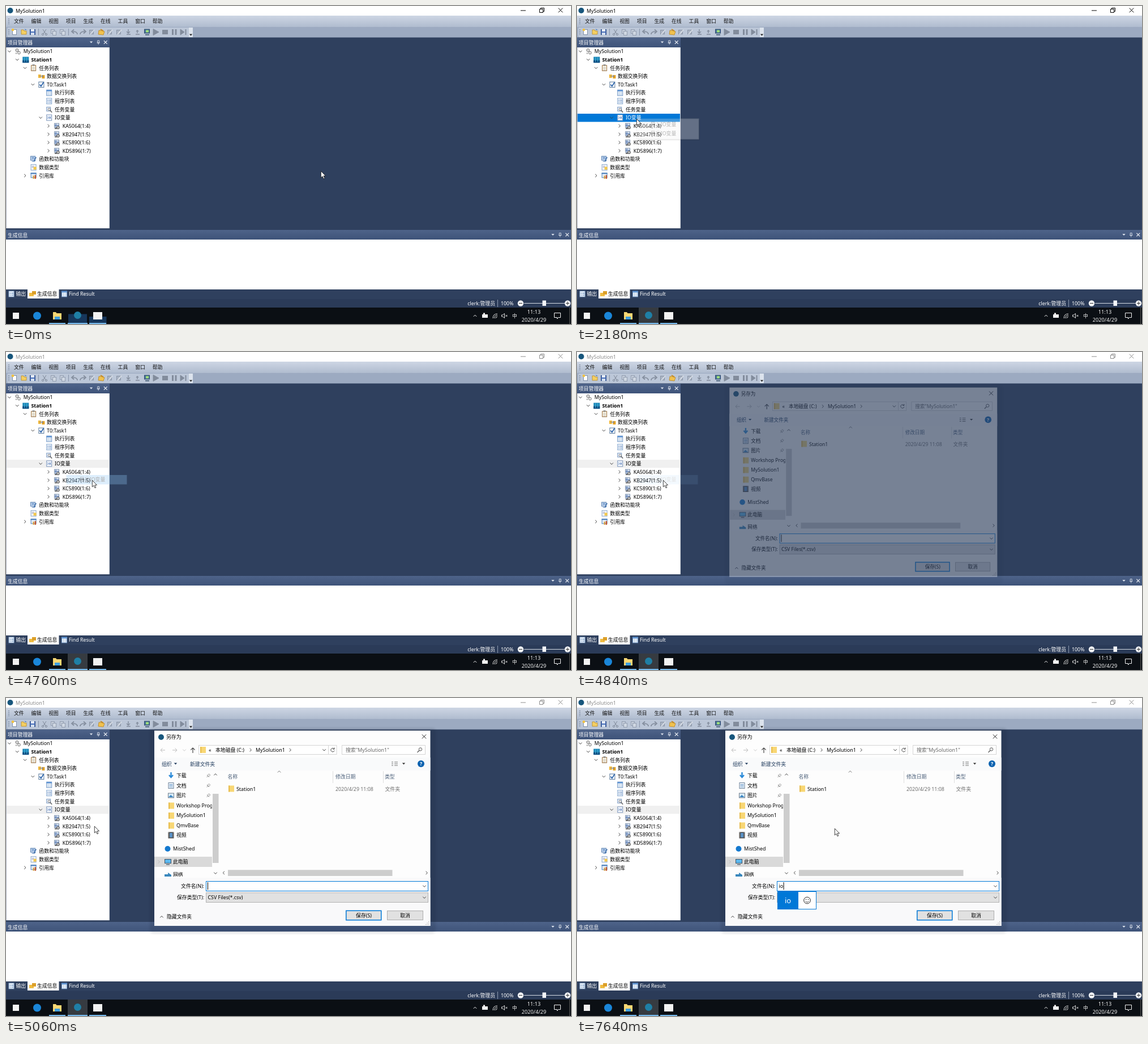
Write an HTML page that moves like this. It is 998 px wide and 561 px high and loops after 8000 ms.

```html
<!DOCTYPE html>
<html lang="zh-CN">
<head>
<meta charset="utf-8">
<title>MySolution1</title>
<style>
html, body { margin: 0; width: 998px; height: 561px; overflow: hidden; background: #2f405e }
svg { display: block; font: 8.85px "Noto Sans", "Noto Sans CJK SC", "Noto Sans CJK", sans-serif }
text { white-space: pre }
</style>
</head>
<body>
<svg id="stage" width="998" height="561" viewBox="0 0 998 561"></svg>
<script>
const rect = (x, y, w, h, fill, more = '') => `<rect x="${x}" y="${y}" width="${w}" height="${h}" fill="${fill}" ${more}/>`;
const box = (x, y, w, h, fill, line, lw = 1) => rect(x + lw / 2, y + lw / 2, w - lw, h - lw, fill, `stroke="${line}" stroke-width="${lw}"`);
const text = (x, y, s, fill = '#000', more = '') => `<text x="${x}" y="${y}" fill="${fill}" ${more}>${s}</text>`;
const dot = (x, y, r, fill, more = '') => `<circle cx="${x}" cy="${y}" r="${r}" fill="${fill}" ${more}/>`;
const path = (d, line = '#333', w = 1, fill = 'none', more = '') => `<path d="${d}" fill="${fill}" stroke="${line}" stroke-width="${w}" ${more}/>`;
const dashed = (d, line, w, dash) => path(d, line, w, 'none', `stroke-dasharray="${dash}"`);
const place = (x, y, s, turn = 0) => `<g transform="translate(${x} ${y}) rotate(${turn})">${s}</g>`;
const chevron = (x, y, turn = 0, line = '#444') => place(x, y, path('M-2.7-1.4L0 1.4L2.7-1.4', line), turn);
const arrowDown = (x, y, fill) => path(`M${x - 2.7} ${y - 1.4}h5.4l-2.7 2.9z`, 'none', 0, fill);
const cross = (x, y, r, line, w = 1) => path(`M${x - r} ${y - r}l${2 * r} ${2 * r}m0 ${-2 * r}l${-2 * r} ${2 * r}`, line, w);
const pin = (x, y, line, turn = 0) => place(x, y, path('M-1.5-3h3v4h-3zM-2.6 1h5.2M0 1v3', line, .9), turn);
const folder = (x, y, w = 10, h = 11) => rect(x, y, w, h, '#f8d775') + rect(x, y, w * .22, h, '#e8bd4e');

const BLUE = '#0078d7', LOGO = '#17567c';

// Icons are drawn around their own centre.
const page = (line, inner) => box(-5, -5.5, 10, 11, '#f6f9fd', line) + inner;
const icons = {
  gears: dot(-1.5, -2, 2.6, '#ddd', 'stroke="#777"') + dot(2, 2.5, 2.4, '#eee', 'stroke="#777"') + dot(-3, 3.5, 1.3, '#aaa'),
  station: rect(-5.5, -5, 11, 10.5, '#1b87b8') + rect(-5.5, 1, 11, 4.5, '#0b4c80') + path('M-2-4v8M2-4v8', '#55bce0'),
  clip: box(-4.5, -5, 9, 10.5, '#fff7e6', '#9a7040') + rect(-2, -6, 4, 2, '#777') + path('M-2.5-1h5M-2.5 1.5h5M-2.5 4h5', '#999', .7),
  swap: rect(-5.5, -3, 5, 6, '#f0b83c') + rect(1, -2, 5, 6, '#e6a323') + path('M-3 0h6M1-2l2 2l-2 2', '#6a7fa5'),
  check: box(-5, -5, 10, 10.5, '#fff', '#56779b') + path('M-3 0l2.4 3L4-4', '#245fa8', 1.7),
  table: page('#6d93c4', rect(-4.5, -5, 9, 2.5, '#5b92d2') + path('M-4.5 0h9M-4.5 3h9M-1.5-2v7M2-2v7', '#a9c3e0', .7)),
  list: page('#86a7cf', path('M-3-2h2M0-2h3.5M-3 0h2M0 0h3.5M-3 2.5h2M0 2.5h3.5', '#5b86bb', .9)),
  tag: box(-5, -4.5, 8, 8, '#e7eef8', '#7e9cc2') + dot(0, 0, 2, '#fff', 'stroke="#777"') + path('M1.5 1.5l3.5 4', '#666', 1.5),
  io: page('#7b94bb', path('M-3-2l2 2l-2 2M0-2l3 4m0-4l-3 4', '#3c67ad', .9)),
  card: box(-5, -5, 9, 8, '#dce6f2', '#7f93ad') + path('M-4-1l7 0M-2-4v7', '#3f64a5', 1) + dot(2, 2.8, 2.5, '#bbb', 'stroke="#555"') + rect(-4, 3.5, 4, 2, '#666'),
  func: rect(-5, -5, 8, 7, '#cadcf2', 'stroke="#577eaf"') + path('M-3-3h4M-3-1h4M-3 4h3', '#4476b5') + path('M0 4l2.5-1V-1l2.5-2', '#3568a8', 1.6),
  type: page('#8aa6c8', path('M-3-2h4M-3 0h4', '#88a', .8) + rect(0, -1, 5, 5, '#f3c84b')),
  lib: box(-5, -5, 10, 9, '#e6eef8', '#4e82bd') + rect(-5, -5, 10, 2, '#4e82bd') + rect(-1, 0, 2, 5.5, '#d99b28') + rect(2, -1, 2.5, 6.5, '#c7572f')
};

// [level, icon, label, 1 = open or 2 = closed branch]
const rows = [
  [0, 'gears', 'MySolution1', 1], [1, 'station', 'Station1', 1], [2, 'clip', '任务列表', 1],
  [3, 'swap', '数据交换列表'], [3, 'check', 'T0:Task1', 1], [4, 'table', '执行列表'],
  [4, 'list', '程序列表'], [4, 'tag', '任务变量'], [4, 'io', 'IO变量', 1],
  [5, 'card', 'KA5064(1:4)', 2], [5, 'card', 'KB2947(1:5)', 2], [5, 'card', 'KC5890(1:6)', 2],
  [5, 'card', 'KD5896(1:7)', 2], [2, 'func', '函数和功能块'], [2, 'type', '数据类型'], [2, 'lib', '引用库', 2]
];

const tree = () => rows.map(([level, icon, label, fold], i) => {
  const x = 31 + 13.8 * level, y = 80 + 14.62 * i;
  const mark = fold ? chevron(x - 25, y, fold == 2 ? -90 : 0) : '';
  const more = (i == 1 ? 'font-weight="bold"' : '') + (i == 8 ? 'id="ioLabel"' : '');
  return mark + place(x - 10, y, icons[icon]) + text(x - .3, y + 3.3, label, '#000', more);
}).join('');

function toolbar() {
  const grey = '#828c9c', y = 46;
  const sheet = x => box(x - 5, y - 5, 7, 8, '#c5cedb', '#929daf') + box(x - 2, y - 2, 7, 8, '#cfd7e2', '#929daf');
  const bolt = x => box(x - 5, y - 4, 8, 8, '#aab4c4', '#8a95a6') + path(`M${x - 3} ${y + 4}l7-8`, '#e0e5ec', 1.5);
  return dashed('M5 41v10', '#6c7a92', 1.4, '1.5 1.5') +
    box(11, 41, 8, 10, '#fff', '#7f8fa8') + dot(12, 42, 2.3, '#f2c140') +
    path('M27 50v-8h4l1 2h4v6z', '#b48a2a', .8, '#f4cf62') + path('M33 41l3 1', '#3a72b8') +
    box(42, 41, 10, 10, '#4a70b8', '#33508a') + rect(44, 41, 6, 4, '#e9eff8') + rect(44, 47, 6, 4, '#d3deee') +
    path('M57.5 40v12M110.5 40v12', '#8692a8') +
    path('M65 41l5 8M71 41l-5 8', grey) + dot(65, 50, 1.6, 'none', `stroke="${grey}"`) + dot(71, 50, 1.6, 'none', `stroke="${grey}"`) +
    sheet(84) + sheet(100) +
    path('M126 50q0-5-8-5M120 41.5l-4 3.5l4 3.5', grey, 1.7) + path('M131 50q0-5 8-5M137 41.5l4 3.5l-4 3.5', grey, 1.7) +
    bolt(152) + path('M163 50l1-7h3l7 2l-2 6z', '#b48428', .8, '#f0c14e') + path('M167 41l5 3', '#c98b1f', 2) +
    bolt(184) + bolt(200) + path('M216 41v6M213 45l3 3l3-3M213 50h7M232 48v-5M230 45l2-2l2 2M229 50h7', grey, 1.4) +
    box(244, 40.5, 10, 8, '#44709b', '#334d6c') + rect(247, 42.5, 5, 4, '#9fdd79') + rect(246, 50, 7, 1.5, '#37516d') +
    path('M260 40.5l10 5.5l-10 5.5z', grey, 1, grey) + rect(276, 42, 10, 8, grey) + rect(293, 41, 3, 10, grey) + rect(298.5, 41, 3, 10, grey) +
    path('M308 41l7 5l-7 5z', grey, 1, grey) + path('M317.5 41v10', grey, 2) +
    rect(323, 38, 7, 17, '#dce3ed') + arrowDown(326.5, 51, '#222');
}

const paneMarks = (x, y) => arrowDown(x, y, '#dfe5ef') + pin(x + 12.7, y, '#dfe5ef') + cross(x + 25.3, y, 2.9, '#eef1f6', 1.2);

function windowBase() {
  const menus = ['文件', '编辑', '视图', '项目', '生成', '在线', '工具', '窗口', '帮助'];
  return `<defs>
      <linearGradient id="bar" x2="0" y2="1"><stop stop-color="#ced6e4"/><stop offset="1" stop-color="#b0bccf"/></linearGradient>
      <linearGradient id="head" x2="0" y2="1"><stop stop-color="#4e6389"/><stop offset="1" stop-color="#3e5379"/></linearGradient>
      <clipPath id="side"><path d="M262 128h102v187H262z"/></clipPath>
    </defs>` +
    rect(0, 0, 998, 561, '#2f405e') + rect(0, 0, 998, 17, '#fff') + dot(7.5, 8, 5, LOGO) +
    `<g id="titleBar">` + text(17, 11.5, 'MySolution1', 'currentColor') +
    path('M909 8h9M942.5 5.5h6v6h-6zM944.5 5.5v-2h6v6h-2', 'currentColor') + cross(979.5, 7.5, 3.8, 'currentColor') + '</g>' +
    rect(0, 17, 998, 20, 'url(#bar)') + rect(0, 37, 998, 18.5, '#9caac1') + rect(2, 38, 328, 17, '#bcc7d8', 'rx="2"') +
    menus.map((s, i) => text(14 + 30.6 * i, 30, s, '#111')).join('') +
    dashed('M5 22v10', '#6c7a92', 1.4, '1.5 1.5') + toolbar() +
    rect(0, 56, 183, 17, 'url(#head)') + text(3, 67.5, '项目管理器', '#fff') + paneMarks(150.5, 64) +
    rect(.4, 73, 182.4, 319.2, '#fff') + rect(1, 190, 181, 14.4, 'none', 'id="rowFill"') + tree() +
    rect(0, 395, 998, 17, 'url(#head)') + text(3, 407.5, '生成信息', '#fff') + paneMarks(966, 403.5) +
    rect(0, 412, 998, 88, '#fff') + rect(38, 500, 55.5, 16, '#fff') +
    place(9.5, 508, icons.list) + text(17.5, 511, '输出', '#fff') +
    rect(41, 506, 8, 6, '#f0bd42') + rect(46, 503, 7, 6, '#dca02a') + text(55, 511, '生成信息') +
    place(103, 508, icons.table) + text(111, 511, 'Find Result', '#fff') +
    rect(0, 517, 998, 15, '#2b3b58') + text(864, 528, 'clerk:管理员', '#fff', 'text-anchor="end"') +
    path('M868.5 518v13', '#8d9ab0') + text(874, 528, '100%', '#fff') +
    path('M915 524.5h72', '#d4dae4') + rect(947.5, 519.5, 6.5, 9.5, '#f4f6f9') +
    dot(909, 524.5, 5.2, '#f4f6f9') + dot(992, 524.5, 5.2, '#f4f6f9') + path('M906 524.5h6M989 524.5h6M992 521.5v6', '#333');
}

function taskbar() {
  const white = '#f2f2f2', line = '#76b9ed';
  return rect(0, 532, 998, 29, '#0b0f14') +
    `<g id="barEarly">` + rect(110, 543.5, 33, 18, '#17375c') + rect(147, 548, 30.5, 13, '#17375c') + '</g>' +
    rect(109, 532, 35, 29, '#363b41', 'id="barActive"') +
    rect(12, 541, 11, 11, white) + dot(55, 546.5, 7, '#1a86d9') +
    path('M83 553v-13h5l1.5 2H98v11z', 'none', 0, '#f7d774') + rect(86, 548, 9, 5, '#3f9fe0') +
    dot(126.5, 545.5, 6.5, '#1f7fa5') + rect(154, 540, 16, 13, white) +
    rect(76, 559, 29, 2, line) + rect(109, 559, 35, 2, line) + rect(147, 559, 30, 2, line) +
    chevron(828.5, 546.5, 180, white) + rect(841, 544, 10, 6, white) + rect(843, 541.5, 3, 3, white) +
    path('M860 551q0-8 8-8M862.5 551q0-5.5 5.5-5.5M865 551q0-3 3-3', '#ddd') +
    path('M875.5 545h2l3-2.5v8l-3-2.5h-2zM882.5 545l3 3m0-3l-3 3', white, .9) +
    text(894, 550, '中', white) +
    text(932.5, 543, '11:13', white, 'text-anchor="middle" font-size="9.2"') +
    text(932.5, 556.5, '2020/4/29', white, 'text-anchor="middle" font-size="9.2"') +
    path('M968.5 541.5h11v8h-4l-2 2.5v-2.5h-5z', white) + path('M995.5 532v29', '#555');
}

const menu = () => `<g id="menu"><g id="menuFrame">` +
  rect(107, 201, 110, 36, '#000', 'opacity=".3"') + box(104.5, 198.5, 111, 37, '#f2f2f2', '#c4c4c4') + '</g>' +
  rect(106.5, 201, 107, 16, '#91c9f7', 'id="hover1"') + rect(106.5, 217, 107, 16.5, '#91c9f7', 'id="hover2"') +
  text(130, 212, '导入IO变量', '#000', 'id="menuText1"') + text(130, 228.3, '导出IO变量') + '</g>';

function sidebar() {
  const names = ['下载', '文档', '图片', 'Workshop Progr', 'MySolution1', 'QmvBase', '视频'];
  const marks = [
    path('M291.5 131v8M288 136l3.5 4l3.5-4', '#2b8ad8', 2.4),
    place(291.5, 154.5, page('#6a8098', path('M-3-2h6M-3 0h6M-3 2.5h6', '#4d87c0', .9))),
    box(286, 167.5, 11, 9, '#d9ecfa', '#707d8a') + path('M287 175l4-4l5 4z', 'none', 0, '#3b86c4'),
    folder(287, 184.5), folder(287, 202), folder(287, 219.5),
    rect(286.5, 236.5, 10, 11, '#444') + rect(289, 238, 5, 8, '#5b91c5') + dashed('M287.7 237v10M295.3 237v10', '#ddd', .8, '1 1')
  ];
  return `<g clip-path="url(#side)">` + rect(262, 280, 102, 18, '#d9d9d9') +
    names.map((s, i) => marks[i] + text(301, 140.3 + 17.5 * i, s) + (i < 3 ? pin(357.5, 137 + 17.5 * i, '#888', 45) : '')).join('') +
    dot(285.5, 266, 5, '#1479cf') + text(295, 269, 'MistShed') +
    chevron(270, 289, -90, '#bbb') + box(280, 284, 12, 8, '#5bb8ee', '#456') + rect(283, 293, 6, 1.5, '#567') + text(295, 292.3, '此电脑') +
    path('M280 315v-4h6v-3l6 4v3z', 'none', 0, '#3a88bd') + text(295, 315, '网络') + '</g>';
}

const dialog = () => {
  const grey = '#6d6d6d', head = '#4c607a';
  return `<g id="dialog">` +
    rect(254, 53, 505, 362, '#101a2c', 'rx="6" opacity=".13" style="filter:blur(2px)"') +
    rect(262, 57.5, 487.5, 344.5, '#fdfdfd') + rect(262, 105, 487.5, 23, '#f9fafb') + rect(262, 317, 487.5, 85, '#f9f9fa') +
    dot(274, 69, 5, LOGO) + text(283, 72.2, '另存为') + cross(738.5, 68, 3.6, '#222') +
    path('M281 92h-8m3.5-3.5l-3.5 3.5l3.5 3.5M294 92h8m-3.5-3.5l3.5 3.5l-3.5 3.5', '#bbb') + chevron(315, 92, 0, '#ccc') +
    path('M330 97v-9m-3.7 3.7l3.7-3.7l3.7 3.7', '#444', 1.2) +
    box(340, 83, 244.5, 17, '#fff', '#d5d5d5') + folder(343, 86) + text(358, 94.5, '«') +
    text(370, 94.7, '本地磁盘 (C:)') + chevron(432, 91.7, -90) + text(441, 94.7, 'MySolution1') + chevron(502, 91.7, -90) +
    chevron(562, 91.7) + path('M569.5 84v15', '#d5d5d5') + path('M579.7 90a3.2 3.2 0 1 0 .4 2.7M580 87.5v2.7h-2.7', '#444') +
    box(593, 83, 148, 17, '#fff', '#d5d5d5') + text(600, 94.7, '搜索"MySolution1"', '#666') +
    dot(732, 90.5, 2.7, 'none', 'stroke="#555"') + path('M730 92.5l-3.5 3.5', '#555', 1.3) +
    text(275, 119.6, '组织', '#1e395b') + arrowDown(299.5, 116, '#1e395b') + text(325, 119.6, '新建文件夹', '#1e395b') +
    path('M681 113h3M681 116h3M681 119h3M686 113h6M686 116h6M686 119h6', '#777', 1.2) + arrowDown(702.5, 116, '#333') +
    dot(733, 116, 6, '#0b62b0') + text(733, 119.4, '?', '#fff', 'text-anchor="middle" font-weight="bold"') +
    sidebar() +
    rect(365, 169, 10.5, 122, '#cdcdcd') + chevron(370, 135, 180) + chevron(370, 309) +
    chevron(482.5, 130, 180, '#777') + path('M577.5 129v21M666.5 129v21', '#dedede') +
    text(391.5, 142, '名称', head) + text(582, 142, '修改日期', head) + text(669, 142, '类型', head) +
    folder(393, 154.5) + text(407, 163.7, 'Station1') + text(582, 163.7, '2020/4/29 11:08', grey) + text(669.5, 163.7, '文件夹', grey) +
    rect(392, 303.3, 290.5, 10.7, '#cdcdcd') + chevron(384.5, 308.5, 90) + chevron(743, 308.5, -90) +
    text(350, 335, '文件名(N):', '#000', 'text-anchor="end"') + box(353, 323, 393, 18, '#fff', BLUE) + chevron(739, 332) +
    text(350, 355, '保存类型(T):', '#000', 'text-anchor="end"') + box(353, 343, 393, 18, '#e1e1e1', '#b3b3b3') +
    text(356.5, 355, 'CSV Files(*.csv)') + chevron(739, 352) +
    chevron(275, 386, 180) + text(284, 388.7, '隐藏文件夹') +
    box(600, 374.5, 63.5, 18, '#e1e1e1', BLUE, 1.5) + text(632, 386.5, '保存(S)', '#000', 'text-anchor="middle"') +
    box(673, 375, 64, 17, '#e1e1e1', '#adadad') + text(705, 386.5, '取消', '#000', 'text-anchor="middle"') +
    dashed('M741 399.5h7M743.5 397h5M746 394.5h2', '#aaa', 1.2, '1.2 1.2') +
    text(356.5, 335, '', '#000', 'id="typed"') + rect(0, 325, 1, 13.3, '#000', 'id="caret"') +
    `<g id="ime">` + box(354, 341, 69, 32, '#fff', BLUE) + rect(354, 341, 37, 32, BLUE) +
    text(372.5, 362, '', '#fff', 'id="candidate" text-anchor="middle" font-size="13"') +
    dot(406.5, 357, 5.8, 'none', 'stroke="#222"') + dot(404.5, 355.5, .8, '#222') + dot(408.5, 355.5, .8, '#222') +
    path('M403.5 358.7q3 3.2 6 0', '#222', .9) + '</g></g>';
};

document.getElementById('stage').innerHTML = windowBase() + taskbar() + menu() + dialog() +
  `<path id="cursor" d="M.3.3V12l2.7-2.5 2 4.4 1.9-.9-2-4.2h3.7z" fill="#fff" stroke="#111" stroke-width=".8"/>`;

// [start, end, points]: one point per evenly spaced step.
const moves = [
  [390, 1170, [[567, 297], [579, 299], [560, 290], [500, 270], [420, 248], [330, 230], [250, 218], [190, 211], [150, 207], [130, 206]]],
  [1260, 1550, [[127, 206], [121, 204], [114, 202], [108, 200], [105, 199]]],
  [2960, 3520, [[107, 202], [113, 206], [120, 211], [128, 216], [137, 220], [145, 223], [150, 225], [152, 226]]],
  [5060, 5370, [[156, 226], [165, 225], [185, 223], [218, 219], [262, 217]]],
  [5440, 5590, [[403, 233], [428, 229], [455, 230]]]
];

function cursorAt(t) {
  let at = [556, 291];
  for (const [a, b, points] of moves)
    points.forEach((p, i) => { if (t >= a + (b - a) * i / (points.length - 1)) at = p; });
  return at;
}

// Value of the latest [time, value] pair already reached.
const latest = (t, first, ...steps) => steps.reduce((v, [at, next]) => t >= at ? next : v, first);
const el = id => document.getElementById(id);
const show = (id, opacity) => el(id).setAttribute('opacity', +opacity);

function draw(t) {
  const [x, y] = cursorAt(t), open = t < 4580;
  el('cursor').setAttribute('transform', `translate(${x} ${y})`);
  show('barEarly', t < 70);
  show('barActive', t >= 70);
  el('titleBar').style.color = t < 4680 ? '#000' : '#8c8c8c';
  el('rowFill').setAttribute('fill', latest(t, 'none', [2180, BLUE], [4680, '#f0f0f0']));
  el('ioLabel').setAttribute('fill', t >= 2180 && t < 4680 ? '#fff' : '#000');

  show('menu', latest(t, 0, [2180, .27], [2260, .65], [2330, 1], [4580, .85], [4680, .55], [4760, .3], [4840, .1], [4900, 0]));
  show('menuFrame', open);
  show('menuText1', open);
  show('hover1', t >= 2960 && y > 201 && y < 217);
  show('hover2', t >= 2960 && y >= 217 || !open);

  const scale = latest(t, .97, [4900, .99], [4980, 1]);
  show('dialog', latest(t, 0, [4840, .35], [4900, .81], [4980, 1]));
  el('dialog').setAttribute('transform', `translate(505.7 229.7) scale(${scale}) translate(-505.7 -229.7)`);

  const typed = latest(t, '', [7220, 'i'], [7380, 'io']);
  el('typed').textContent = el('candidate').textContent = typed;
  el('caret').setAttribute('x', latest(t, 356, [7220, 359.5], [7380, 364.6]));
  show('caret', latest(t, 1, [5370, 0], [5920, 1], [6380, 0], [6910, 1], [7380, 0], [7640, 1]));
  show('ime', t >= 7300);
}

const start = performance.now();
(function tick() {
  draw((performance.now() - start) % 8000);
  requestAnimationFrame(tick);
})();
</script>
</body>
</html>
```
